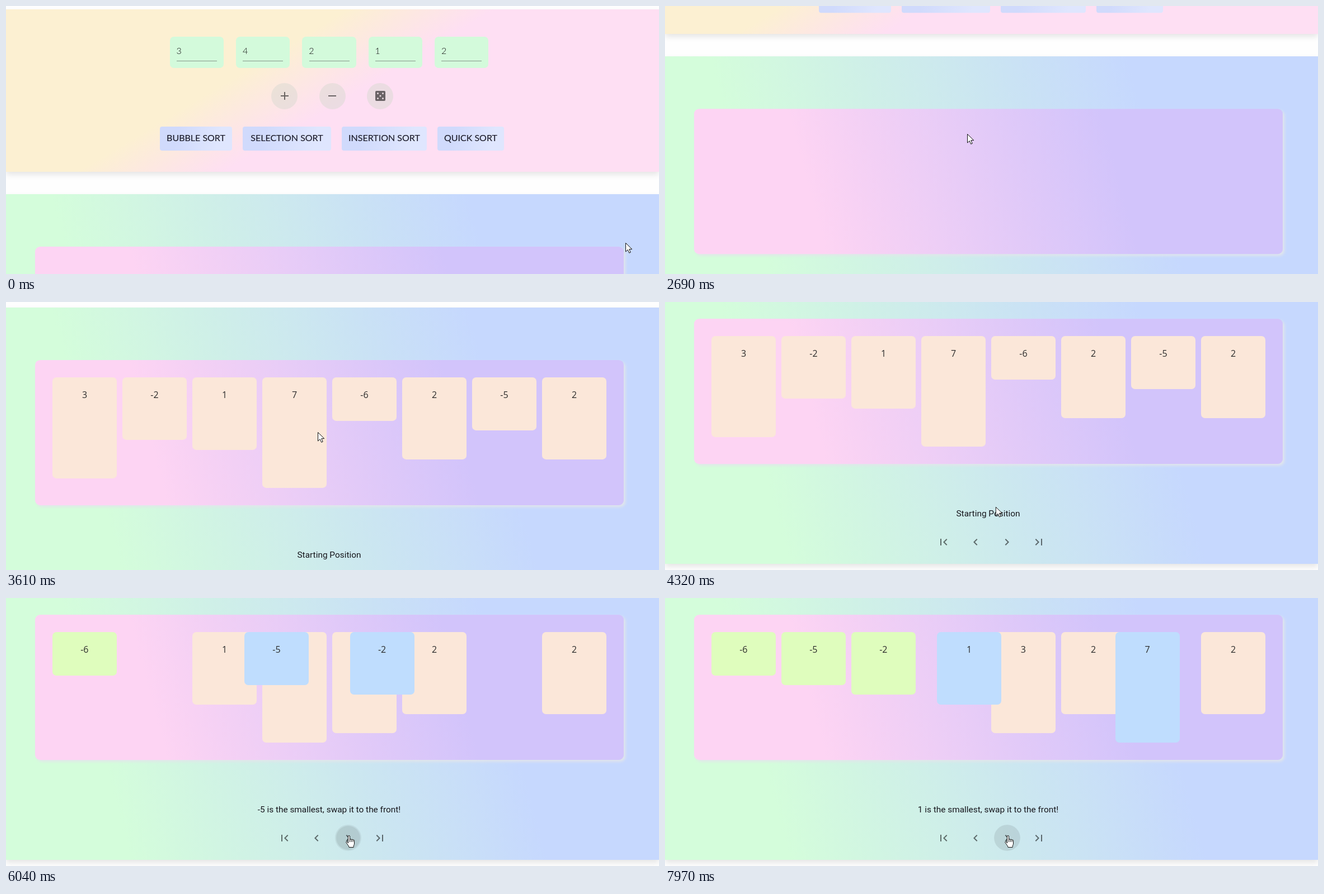
An HTML page for the animation above (8 s loop, 1167x480 px).

```html
<!DOCTYPE html>
<html lang="en">
<head>
<meta charset="utf-8">
<title>Sorting visualiser</title>
<style>
html, body { margin: 0; width: 100%; height: 100%; overflow: hidden; background: #fefefe; }
body { position: relative; }
#page, #page div, #cursor, #page svg { position: absolute; box-sizing: border-box; }
#page { left: 0; top: 0; width: 1167px; height: 881px; }
.band { left: 0; width: 1167px; box-shadow: 0 5px 10px rgba(0, 0, 0, .1); }
#controls { top: 6px; height: 291px; background: linear-gradient(149deg, #fcf0d2 37%, #fedff3 53%); }
#viewer { top: 337px; height: 533px; background: linear-gradient(75deg, #d4fddb 17%, #c6d8fe 74%); }
#panel { left: 52px; top: 94px; width: 1052px; height: 260px; border-radius: 9px;
  background: linear-gradient(75deg, #fdd4f3 21%, #d2c4fb 71%); box-shadow: 3px 3px 5px #e2e6ea; }
.field { top: 49px; width: 96.5px; height: 56px; border-radius: 7px; background: #d3fadb;
  font: 300 16px/50px Lato, sans-serif; color: #111; padding-left: 12px; }
.field::after { content: ""; position: absolute; left: 12.5px; top: 43px; width: 72px; height: 1px; background: #85968a; }
.round { width: 47px; height: 47px; border-radius: 50%; }
.tool { top: 131.5px; background: rgba(218, 218, 209, .5); }
.round svg { left: 11.5px; top: 11.5px; fill: rgba(0, 0, 0, .55); }
.sort { top: 210px; height: 43px; border-radius: 4px; text-align: center; color: #1d1d2b;
  font: 16px/39px Lato, sans-serif; -webkit-text-stroke: .15px; background: linear-gradient(105deg, #d0dafc 25%, #dfe6fe 80%); }
.card { top: 31px; width: 115px; border-radius: 7px; text-align: center; color: #2b2b2b; font: 16px/63px "Open Sans", sans-serif; }
#caption { left: 0; width: 1155px; top: 431px; text-align: center; color: #16161c; font: 15.4px/24px Roboto, sans-serif; }
.nav { top: 470px; }
#next { overflow: hidden; }
#ripple { left: 0; top: 0; width: 47px; height: 47px; border-radius: 50%; }
#cursor { left: 0; top: 0; overflow: visible; pointer-events: none; fill: #fff; stroke: #111; stroke-linejoin: round; }
</style>
</head>
<body>
<div id="page">
  <div id="controls" class="band"></div>
  <div id="viewer" class="band"><div id="panel"></div><div id="caption"></div></div>
</div>
<svg id="cursor" width="24" height="24">
  <path id="arrow" d="M.5 .5V16L4.2 12.6L6.7 18.3L9.2 17.2L6.8 11.6H11.8Z"/>
  <g id="hand" transform="translate(-7 0)">
    <path d="M5.5 14V2a1.5 1.5 0 0 1 3 0V8a1.4 1.4 0 0 1 2.8 .5a1.4 1.4 0 0 1 2.8 .5a1.3 1.3 0 0 1 2.4 1V15c0 2-1.5 3-1.5 6.5H7c0-2-2-4-5-8.5c-.8-1.8 1.2-2.4 2.2-1.2z"/>
    <path fill="none" d="M8.5 8v4M11.3 8.5v3.5M14.1 9v3"/>
  </g>
</svg>
<script>
const LOOP = 8000, SWAP_MS = 500, SLOT = 125, FIELD_STEP = 118.36, FIELD_WIDTH = 96.5;
const ADD_START = 700, ADD_EVERY = 195, ROLL = 1440;
const firstValues = [3, 4, 2, 1, 2];
const values = [3, -2, 1, 7, -6, 2, -5, 2];
const clicks = [4865, 5740, 6714, 7555];

const $ = id => document.getElementById(id);
const clamp = x => Math.max(0, Math.min(1, x));
const span = (t, from, to) => clamp((t - from) / (to - from));
const easeOut = (x, power) => 1 - Math.pow(1 - x, power);

function smooth(t, from, to) {
  const x = span(t, from, to);
  return x * x * (3 - 2 * x);
}

function add(parent, cls, css, html = '') {
  const el = document.createElement('div');
  el.className = cls;
  Object.assign(el.style, css);
  el.innerHTML = html;
  return parent.appendChild(el);
}

const icon = d => `<svg width="24" height="24"><path fill-rule="evenodd" d="${d}"/></svg>`;
const pip = (x, y) => `M${x - 1.5} ${y}a1.5 1.5 0 1 0 3 0a1.5 1.5 0 1 0-3 0z`;
const corners = [7.5, 16.5].map(x => pip(x, 7.5) + pip(x, 16.5)).join('');
const tools = [
  'M19 13h-6v6h-2v-6H5v-2h6V5h2v6h6z',
  'M19 13H5v-2h14z',
  'M5 3H19a2 2 0 0 1 2 2V19a2 2 0 0 1-2 2H5a2 2 0 0 1-2-2V5a2 2 0 0 1 2-2z' + corners + pip(12, 12)
];
const navs = [
  'M18.41 16.59L13.82 12l4.59-4.59L17 6l-6 6 6 6zM6 6h2v12H6z',
  'M15.41 7.41L14 6l-6 6 6 6 1.41-1.41L10.83 12z',
  'M10 6L8.59 7.41 13.17 12l-4.58 4.59L10 18l6-6z',
  'M5.59 7.41L10.18 12l-4.59 4.59L7 18l6-6-6-6zM16 6h2v12h-2z'
];
const sorts = [['BUBBLE SORT', 275, 129], ['SELECTION SORT', 423, 158], ['INSERTION SORT', 600, 152], ['QUICK SORT', 771, 119]];

// Where the pointer rests: arrives, leaves, x, y.
const rests = [
  [0, 70, 1107, 424],
  [620, 1120, 497, 160],
  [1380, 1460, 668, 160],
  [1740, 1780, 542, 223],
  [1920, 3400, 540, 229],
  [3610, 3780, 557, 233],
  [4640, 5500, 606, 427],
  [5760, LOOP, 613, 425]
];

const fields = values.map(() => add($('controls'), 'field', {}));
tools.forEach((d, i) => add($('controls'), 'round tool', { left: 474 + i * 85.5 + 'px' }, icon(d)));
sorts.forEach(([name, x, w]) => add($('controls'), 'sort', { left: x + 'px', width: w + 'px' }, name));
const [, , next] = navs.map((d, i) => add($('viewer'), 'round nav', { left: 474.5 + i * 56.5 + 'px' }, icon(d)));
next.id = 'next';
add(next, '', {}).id = 'ripple';
const cards = values.map(v => add($('panel'), 'card', {
  height: 78 + 17.2 * values.filter(o => o < v).length + 'px'
}, v));

// Selection sort: the smallest remaining card trades places with the front one.
function sortSteps(count) {
  const order = values.map((_, i) => i);
  let pair = [];
  for (let front = 0; front < count; front++) {
    let least = front;
    order.forEach((id, i) => { if (i > front && values[id] < values[order[least]]) least = i; });
    [order[front], order[least]] = [order[least], order[front]];
    pair = [front, least];
  }
  return { order, pair };
}

function drawFields(t) {
  const added = Math.floor((t - ADD_START) / ADD_EVERY) + 1;
  const count = Math.min(values.length, firstValues.length + Math.max(0, added));
  const left = 577.5 - (FIELD_STEP * (count - 1) + FIELD_WIDTH) / 2;
  fields.forEach((el, i) => {
    el.style.display = i < count ? '' : 'none';
    el.style.left = left + FIELD_STEP * i + 'px';
    el.textContent = t < ROLL ? firstValues[i] || 0 : values[i];
  });
}

function drawCards(t) {
  const done = clicks.filter(c => c <= t);
  const { order, pair } = sortSteps(done.length);
  const moved = smooth(t, done.at(-1), done.at(-1) + SWAP_MS);
  const grow = easeOut(span(t, 2880, 3300), 1.4);
  order.forEach((id, slot) => {
    const active = pair.includes(slot);
    const from = active ? pair[0] + pair[1] - slot : slot;
    const x = active ? from + (slot - from) * moved : slot;
    Object.assign(cards[id].style, {
      left: 30.8 + SLOT * x + 'px',
      zIndex: active ? 10 + slot : 1,
      background: active ? '#bfddfe' : slot < pair[0] ? '#dffdbd' : '#fbe7d9',
      transform: `scale(${grow})`,
      opacity: grow
    });
  });
  $('caption').textContent = done.length
    ? `${values[order[pair[0]]]} is the smallest, swap it to the front!`
    : 'Starting Position';
}

function drawRipple(t) {
  const age = t + 40 - (clicks.filter(c => c <= t + 40).at(-1) ?? -LOOP);
  $('ripple').style.background = `rgba(0,0,0,${.085 * (1 - span(age, 290, 560))})`;
  $('ripple').style.transform = `scale(${easeOut(clamp(age / 550), 2.5)})`;
}

function drawCursor(t) {
  const i = rests.findLastIndex(r => r[0] <= t);
  const [, leave, x0, y0] = rests[i];
  const [arrive, , x1, y1] = rests[i + 1] || rests[i];
  const k = smooth(t, leave, arrive);
  const x = x0 + (x1 - x0) * k, y = y0 + (y1 - y0) * k;
  const over = document.elementFromPoint(x, y)?.closest('.tool, .sort, .nav');
  $('cursor').style.transform = `translate(${x}px, ${y}px)`;
  $('hand').style.display = over ? '' : 'none';
  $('arrow').style.display = over ? 'none' : '';
  next.style.background = over === next ? 'rgba(0,0,0,.06)' : 'none';
}

const start = performance.now();
function frame() {
  const t = (performance.now() - start) % LOOP;
  const scroll = 271 * smooth(t, 2030, 2840) + 130 * smooth(t, 3502, 3742);
  $('page').style.transform = `translateY(${-scroll}px)`;
  drawFields(t);
  drawCards(t);
  drawRipple(t);
  drawCursor(t);
  requestAnimationFrame(frame);
}
frame();
</script>
</body>
</html>
```
